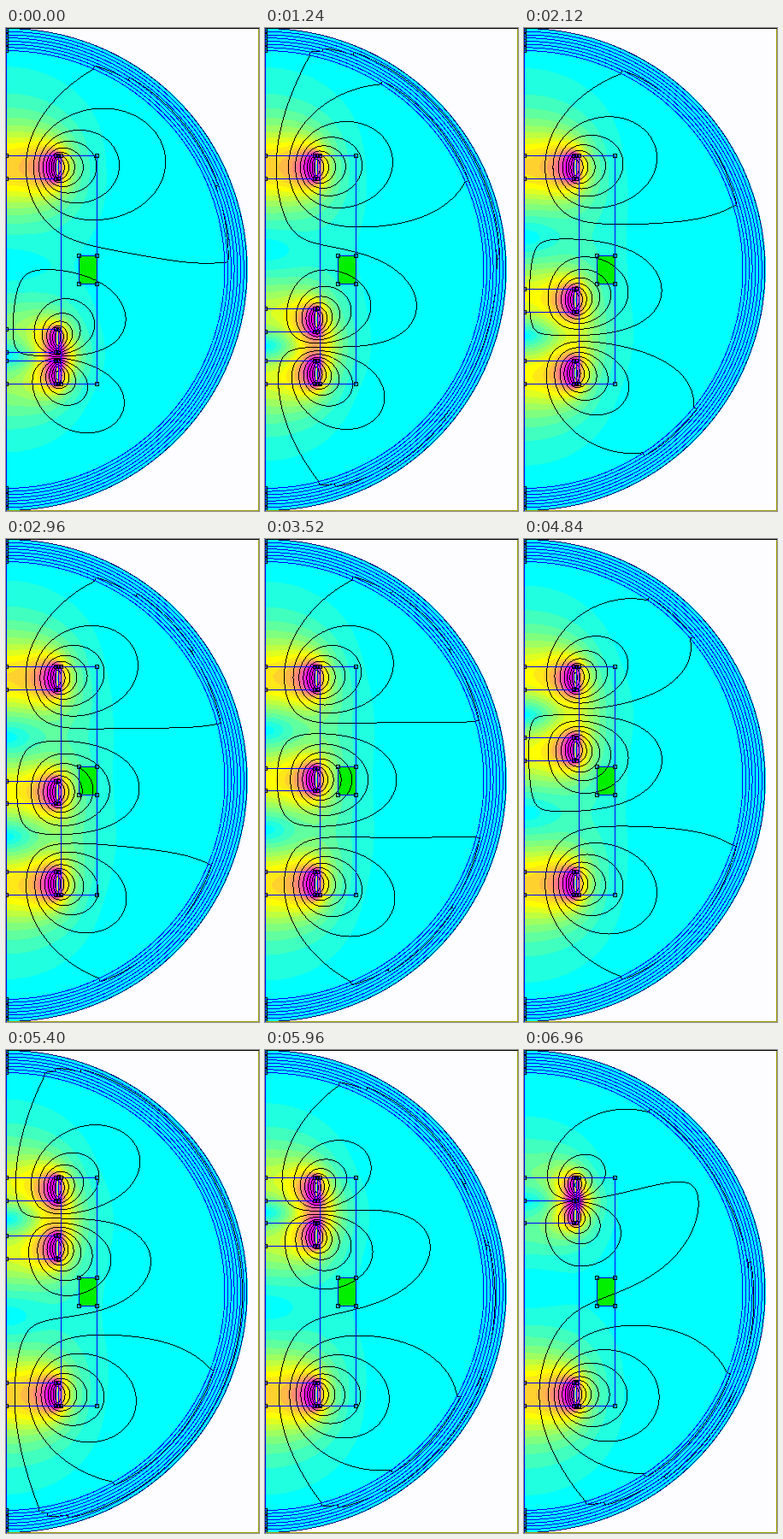
Recreate the animation shown at these times as an HTML page with a canvas. Size 296x565 px, loop 7 s.

```html
<!DOCTYPE html>
<html lang="en">
<head>
<meta charset="utf-8">
<title>Moving coil field</title>
<style>
  html, body { margin: 0; width: 296px; height: 565px; overflow: hidden; background: #fdfdff; }
  canvas, svg { position: absolute; left: 0; top: 0; display: block; }
  canvas { image-rendering: pixelated; }
  svg { shape-rendering: crispEdges; fill: none; stroke: #0000ff; stroke-width: 1; }
  .node { stroke: #000; }
</style>
</head>
<body>
<canvas id="field" width="296" height="565"></canvas>
<svg id="plan" width="296" height="565" viewBox="0 0 296 565"></svg>
<script>
const W = 296, H = 565, CY = 282;
const R_IN = 256, R_OUT = 282, LAYERS = 7;
const COIL_X = 58, COIL_W = 3, COIL_H = 26.6, TOP = 149.2, BOTTOM = 389.2;
const GAPS = 17;                     // flux intervals; an odd count straddles the middle value
const SHADES = 20, YELLOW = 8, B_SCALE = 65;
const STEP = 40, LOOP = 7000;
const BLOCK = { x: 85, y: 266, w: 21, h: 33 };
const N = 285;                       // radial samples per row

// Flux function of a circular loop of radius a (arithmetic-geometric mean).
function loopFlux(a, r, z) {
  if (r === 0) return 0;
  const m = 4 * a * r / ((a + r) ** 2 + z * z);
  let p = 1, q = Math.sqrt(1 - m), sum = 0, w = 1;
  for (let i = 0; i < 7; i++) {
    const c = (p - q) / 2, g = Math.sqrt(p * q);
    p = (p + q) / 2;
    q = g;
    sum += w * c * c;
    w *= 2;
    if (c < 1e-7) break;
  }
  return Math.sqrt(a * r / m) * sum / (2 * p);
}

// Flux of one whole coil, by distance from its middle plane.
const DIST = 440, HALF = 13;
const coilFlux = (() => {
  const rows = DIST + HALF;
  const ring = new Float64Array(rows * N), out = new Float64Array(DIST * N);
  for (let z = 0; z < rows; z++)
    for (let r = 0; r < N; r++)
      ring[z * N + r] = (loopFlux(COIL_X + 0.5, r, z) + loopFlux(COIL_X + 2.5, r, z)) / 2;
  for (let r = 0; r < N; r++)
    for (let z = 0; z < DIST; z++) {
      let s = 0;
      for (let o = -HALF; o <= HALF; o++) s += ring[Math.abs(z + o) * N + r];
      out[z * N + r] = s / (2 * HALF + 1);
    }
  return out;
})();

function addCoil(psi, top, sign) {
  const mid = top + COIL_H / 2;
  for (let y = 0; y < H; y++) {
    const d = Math.abs(y - mid), j = Math.floor(d), f = d - j;
    const a = j * N, b = a + N, row = y * N;
    for (let r = 0; r < N; r++)
      psi[row + r] += sign * (coilFlux[a + r] * (1 - f) + coilFlux[b + r] * f);
  }
}

// Layered open boundary: flux falls to zero in every second layer.
const shell = [], inside = new Uint8Array(H * N);
for (let y = 0; y < H; y++)
  for (let r = 0; r < N; r++) {
    const R = Math.hypot(r, y - CY);
    inside[y * N + r] = R < R_IN ? 1 : R <= R_OUT + 0.4 ? 2 : 0;
    if (R <= R_IN) continue;
    const u = (R - R_IN) / (R_OUT - R_IN) * LAYERS;
    const drop = Math.min(1, (Math.floor(u / 2) + Math.max(0, u % 2 - 1)) / 3);
    const k = (R_IN - 1) / R, x = r * k, v = CY + (y - CY) * k;
    const x0 = Math.floor(x), y0 = Math.floor(v);
    shell.push({ at: y * N + r, from: y0 * N + x0, fx: x - x0, fy: v - y0, keep: 1 - drop });
  }

function closeBoundary(psi) {
  const raw = psi.slice();
  for (const s of shell) {
    const i = s.from;
    const a = raw[i] + (raw[i + 1] - raw[i]) * s.fx;
    const b = raw[i + N] + (raw[i + N + 1] - raw[i + N]) * s.fx;
    psi[s.at] = (a + (b - a) * s.fy) * s.keep;
  }
}

const rgba = (r, g, b) => (255 << 24 | b << 16 | g << 8 | r) >>> 0;
const BLACK = rgba(0, 0, 0), CYAN = rgba(0, 255, 255), GREEN = rgba(0, 240, 0);
const PAPER = rgba(253, 253, 255);
// cyan -> yellow -> magenta
const ramp = Array.from({ length: SHADES }, (_, i) => {
  const up = Math.round(255 * Math.min(1, i / YELLOW));
  const past = Math.round(255 * Math.max(0, (i - YELLOW) / (SHADES - 1 - YELLOW)));
  return rgba(up, 255 - past, 255 - up + past);
});

const ctx = document.getElementById("field").getContext("2d");
const image = ctx.createImageData(W, H);
const pixels = new Uint32Array(image.data.buffer);
const fixed = new Float64Array(H * N), psi = new Float64Array(H * N);
addCoil(fixed, TOP, 1);
addCoil(fixed, BOTTOM, 1);

const inBlock = (x, y) =>
  x >= BLOCK.x && x < BLOCK.x + BLOCK.w && y >= BLOCK.y && y < BLOCK.y + BLOCK.h;

function drawField(top) {
  psi.set(fixed);
  addCoil(psi, top, -1);
  closeBoundary(psi);
  let lo = 0, hi = 0;
  for (const v of psi) {
    if (v < lo) lo = v;
    if (v > hi) hi = v;
  }
  const gap = (hi - lo) / GAPS;
  pixels.fill(PAPER);
  for (let y = 0; y < H; y++) {
    const up = y ? -N : 0, down = y < H - 1 ? N : 0;
    for (let x = 0; x < N - 1; x++) {
      const i = y * N + x, zone = inside[i];
      if (!zone) continue;
      const c = x || 1, j = y * N + c;
      const gx = (psi[j + 1] - psi[j - 1]) / 2;
      const gy = (psi[j + down] - psi[j + up]) / 2;
      const b = Math.hypot(gx, gy) / c;
      let colour = zone === 2 ? CYAN
        : ramp[Math.min(SHADES - 1, Math.floor(b * B_SCALE * SHADES))];
      if (inBlock(x, y)) colour = GREEN;
      const level = (psi[i] - lo) / gap, near = Math.round(level);
      const reach = Math.max(Math.abs(gx), Math.abs(gy)) / 2;
      if (x && near > 0 && near < GAPS && Math.abs(level - near) * gap < reach) colour = BLACK;
      pixels[y * W + x] = colour;
    }
  }
  ctx.putImageData(image, 0, 0);
}

const line = (x1, y1, x2, y2, colour = "#0000ff") =>
  `<path d="M${x1 + 0.5} ${y1 + 0.5}L${x2 + 0.5} ${y2 + 0.5}" stroke="${colour}"/>`;
const node = (x, y) =>
  `<rect class="node" x="${x - 1.5}" y="${y - 1.5}" width="4" height="4"/>`;
const box = (x, y, w, h) => `<rect x="${x + 0.5}" y="${y + 0.5}" width="${w}" height="${h}"/>`;

function coil(top) {
  const y1 = Math.round(top), y2 = Math.round(top + COIL_H);
  let s = box(COIL_X, y1, COIL_W, y2 - y1);
  for (const y of [y1, y2])
    s += line(0, y, COIL_X, y) + node(0, y) + node(COIL_X, y) + node(COIL_X + COIL_W, y);
  return s;
}

function plan() {
  const first = Math.round(TOP), last = Math.round(BOTTOM + COIL_H);
  const right = BLOCK.x + BLOCK.w;
  let s = "", marks = "";
  for (let i = 0; i <= LAYERS; i++) {
    const r = R_IN + (R_OUT - R_IN) * i / LAYERS;
    s += `<circle cx="0" cy="${CY + 0.5}" r="${r}" stroke="${i === LAYERS ? "#000080" : "#0000ff"}"/>`;
    marks += node(0, Math.round(CY - r)) + node(0, Math.round(CY + r));
  }
  s += line(0, 0, 0, H);
  for (const x of [64, right]) {
    s += line(x, first, x, last);
    marks += node(x, first) + node(x, last);
  }
  for (const y of [first, last]) s += line(0, y, right, y);
  s += box(BLOCK.x, BLOCK.y, BLOCK.w, BLOCK.h);
  for (const y of [BLOCK.y, BLOCK.y + BLOCK.h]) marks += node(BLOCK.x, y) + node(right, y);
  s += coil(TOP) + coil(BOTTOM) + marks;
  s += line(0, 0, W, 0, "#000") + line(W - 1, 0, W - 1, H, "#a0a000") + line(0, H - 1, W, H - 1, "#a0a000");
  return s + '<g id="mover"></g>';
}
document.getElementById("plan").innerHTML = plan();
const mover = document.getElementById("mover");

// A short hold, then steady travel upward.
const coilTop = step => 351.92 - 1.068 * Math.max(0, step - 9);

let shown = -1;
const start = performance.now();
function frame(now) {
  const step = Math.floor((Math.max(0, now - start) % LOOP) / STEP);
  if (step !== shown) {
    shown = step;
    const top = coilTop(step);
    drawField(top);
    mover.innerHTML = coil(top);
  }
  requestAnimationFrame(frame);
}
frame(start);
</script>
</body>
</html>
```
